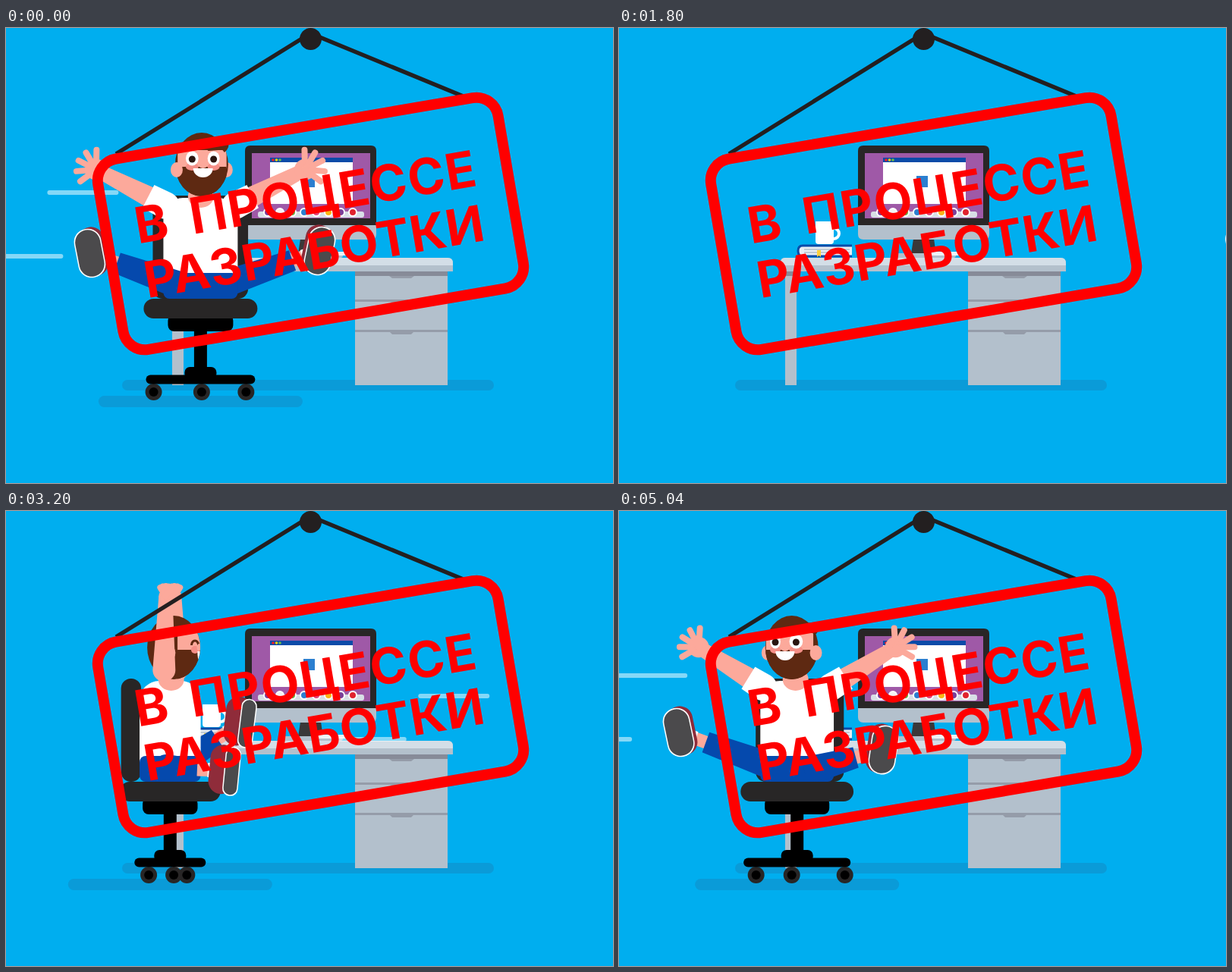
These frames come from a looping animation (800x600 px, 5.08 s). An HTML page with a canvas:

```html
<!DOCTYPE html>
<html lang="ru">
<head>
<meta charset="utf-8">
<title>В процессе разработки</title>
<style>
  html, body { margin: 0; width: 100%; height: 100%; overflow: hidden; background: #00aeef; }
  svg, canvas { position: absolute; left: 0; top: 0; width: 800px; height: 600px; display: block; }
  .sign text { font: 700 66px Inter, "DejaVu Sans", sans-serif; fill: #f00; text-anchor: middle; }
</style>
</head>
<body>
<svg viewBox="0 0 800 600">
  <rect x="153" y="464" width="490" height="14" rx="7" fill="#0a9bd8"/>
  <!-- desk -->
  <rect x="219" y="318" width="15" height="153" fill="#b3c0cc"/>
  <rect x="460" y="318" width="122" height="153" fill="#b3c0cc"/>
  <path d="M219 320h15v7h-15zM460 320h122v7H460z" fill="#878b98"/>
  <path d="M460 359.500H582M460 399.500H582" stroke="#959ca9" stroke-width="3"/>
  <path d="M505 327h33l-4 3h-25zM505 360h33l-4 3h-25zM505 400h33l-4 4h-25z" fill="#959ca9"/>
  <path d="M213 321V309q0-6 6-6H582q7 0 7 7v11z" fill="#b3c0cc"/>
  <path d="M213 313V309q0-6 6-6H582q7 0 7 7v3z" fill="#d3dee7"/>
  <!-- computer -->
  <path d="M388 278h27l3 20h-33z" fill="#3a3839"/>
  <rect x="360" y="297" width="84" height="6" rx="3" fill="#b3c0cc"/>
  <rect x="405" y="295" width="48" height="5" rx="2" fill="#eef3f7"/>
  <path d="M315 258H488V272q0 7-7 7H322q-7 0-7-7z" fill="#b3c0cc"/>
  <path d="M315 260V162q0-7 7-7H481q7 0 7 7V260z" fill="#292626"/>
  <rect x="324" y="165" width="156" height="86" fill="#9f59a7"/>
  <rect x="348" y="171" width="109" height="61" fill="#fff"/>
  <rect x="348" y="171" width="109" height="6" fill="#0b4ba8"/>
  <circle cx="352" cy="174" r="1.800" fill="#ed1c24"/>
  <circle cx="356.500" cy="174" r="1.800" fill="#ffd400"/>
  <circle cx="361" cy="174" r="1.800" fill="#6cbf45"/>
  <rect x="392" y="195" width="15" height="15" fill="#2b7fd0"/>
  <rect x="332" y="242" width="140" height="8" rx="3" fill="#d8dfe6"/>
  <g id="dock" stroke="#fff" stroke-width="2"></g>
  <!-- books and cup -->
  <path d="M307 287H242q-6 0-6 7t6 7H307" fill="#e9eef3" stroke="#0b4ba8" stroke-width="3"/>
  <path d="M244 292H304M244 296H304" stroke="#b3c0cc" stroke-width="1.500"/>
  <path d="M261 293h5v9l-2.500-2-2.500 2z" fill="#ffd23c"/>
  <circle cx="283" cy="271" r="7" fill="none" stroke="#fff" stroke-width="4"/>
  <path d="M259 255h24v26q0 4-4 4h-16q-4 0-4-4z" fill="#fff"/>
</svg>

<canvas id="stage" width="800" height="600"></canvas>

<svg class="sign" viewBox="0 0 800 600">
  <path d="M145 166L398 9M406 9L605 91" stroke="#231f20" stroke-width="5.500" fill="none"/>
  <circle cx="401.500" cy="14.500" r="14.500" fill="#231f20"/>
  <rect x="-267.500" y="-127.500" width="535" height="255" rx="29" fill="none" stroke="#f00" stroke-width="14"
        transform="translate(401.500 258) rotate(-9.700)"/>
  <text transform="translate(399 246) rotate(-9.700)" letter-spacing="1.500" word-spacing="11">В ПРОЦЕССЕ</text>
  <text transform="translate(410 318) rotate(-9.700)" letter-spacing=".5">РАЗРАБОТКИ</text>
</svg>

<script>
const g = document.getElementById('stage').getContext('2d');
const { sin, cos, abs, min, max, PI } = Math;
const SKIN = '#fca99b', HAIR = '#5e2912', BLUE = '#0549ad', DARK = '#282626', SHOE = '#8f2c3a';
const STEP = 40, FRAMES = 127, SPEED = 21.72, SPIN = 18;

// Foot path around the chair: angle, x, y
const FOOT = [
  [-165, 167, 285], [-118, 166, 337], [-51, 3, 347], [-15, -114, 315], [-3, -146, 297],
  [3, -157, 294], [15, -156, 292], [51, -135, 290], [118, -40, 265], [165, 120, 268], [195, 167, 285]
];

document.getElementById('dock').innerHTML =
  ['#7b3f98', '#f4f4f4', '#5fb446', '#2b7fd0', '#e0457b', '#f9b516', '#7b3f98', '#e0232e']
    .map((c, i) => `<circle cx="${345 + 16 * i}" cy="243" r="5" fill="${c}"/>`).join('');

function box(x, y, w, h, r, fill) {
  g.fillStyle = fill;
  g.beginPath();
  g.roundRect(x, y, w, h, r);
  g.fill();
}

function oval(x, y, rx, ry, fill) {
  g.fillStyle = fill;
  g.beginPath();
  g.ellipse(x, y, rx, ry, 0, 0, 2 * PI);
  g.fill();
}

function line(x1, y1, x2, y2, width, color, cap = 'round') {
  g.strokeStyle = color;
  g.lineWidth = width;
  g.lineCap = cap;
  g.beginPath();
  g.moveTo(x1, y1);
  g.lineTo(x2, y2);
  g.stroke();
}

// Tapered limb, round at the first end and flat at the second
function limb(x1, y1, r1, x2, y2, r2, fill) {
  const a = Math.atan2(y2 - y1, x2 - x1), nx = -sin(a), ny = cos(a);
  g.fillStyle = fill;
  g.beginPath();
  g.arc(x1, y1, r1, a + PI / 2, a - PI / 2);
  g.lineTo(x2 - nx * r2, y2 - ny * r2);
  g.lineTo(x2 + nx * r2, y2 + ny * r2);
  g.fill();
}

function footAt(deg) {
  const a = ((deg + 165) % 360 + 360) % 360 - 165;
  const i = max(1, FOOT.findIndex(k => k[0] >= a));
  const [a0, x0, y0] = FOOT[i - 1], [a1, x1, y1] = FOOT[i];
  const k = (a - a0) / (a1 - a0);
  return [x0 + (x1 - x0) * k, y0 + (y1 - y0) * k];
}

function chairBase(s, c) {
  const c2 = c * c, half = Math.sqrt(2116 + 3068 * c2), shift = 18 * s * c, reach = 24 + 37 * c2;
  const neck = 36 + 7 * c2, seat = 66 + 9 * c2;
  box(-8.5, 395, 17, 60, 0, '#000');
  box(-21, 447, 42, 16, 7, '#000');
  for (const x of [shift - reach, shift + reach, -28 * s * c]) {
    oval(x, 480, 11, 11, DARK);
    oval(x, 480, 6, 6, '#000');
  }
  box(-half, 457.5, 2 * half, 12, 6, '#000');
  box(-neck, 378, 2 * neck, 22, 8, '#000');
  box(-seat, 357, 2 * seat, 26, 13, DARK);
}

function backrest(s, c) {
  const half = 13 + 50 * abs(c) ** 3;
  box(53 * s * abs(s) - half, 221, 2 * half, 136, 13, DARK);
}

function leg(side, deg, c) {
  const [fx, y] = footAt(side * deg), x = side * fx;
  const hx = -side * 28 * c, hy = 339, dx = hx - x, dy = hy - y;
  const len = Math.hypot(dx, dy) || 1;
  const at = d => [x + dx * min(d / len, .8), y + dy * min(d / len, .8)];
  const [ax, ay] = at(24), [cx, cy] = at(38);
  line(x, y, cx, cy, 17, SKIN);
  line(x, y, ax, ay, 19, '#fff', 'butt');
  limb(hx, hy, 18, cx, cy, 14, BLUE);

  const w = 35 * min(1, max(.3, .35 + 1.2 * c)), out = -Math.sign(dx);
  g.save();
  g.translate(x, y);
  g.rotate(x / 160 * .21);
  const upper = () => box(-17 - out * 5, -34, 34, 65, 17, SHOE);
  const sole = () => {
    const sx = out * (35 - w) / 2;
    box(sx - w / 2 - .5, -32.5, w + 1, 65, w / 2, '#fff');
    box(sx - w / 2 + 1, -31, w - 2, 62, w / 2, '#4b4a4c');
  };
  if (c < -.6) upper();
  else { upper(); sole(); }
  g.restore();
}

function arm(side, c) {
  const c2 = c * c, k = abs(c);
  const x = -side * 138 * Math.sign(c) * k ** 1.8, y = 112 + 75 * k ** 3;
  const sx = -side * 46 * c, sy = 209 + 25 * c2;
  limb(sx, sy, 15, x, y, 9, SKIN);
  const dir = Math.atan2(y - sy, x - sx), spread = .28 + .28 * c2, reach = 13 + 13 * c2;
  oval(x, y, 9 + 5 * c2, 9 + 5 * c2, SKIN);
  for (let i = -2; i <= 2; i++) {
    const a = dir + i * spread;
    line(x, y, x + cos(a) * reach, y + sin(a) * reach, 8, SKIN);
  }
  if (c2 > .2) {
    const f = .25 * c2;
    limb(sx, sy, 18, sx + (x - sx) * f, sy + (y - sy) * f, 17, '#fff');
  }
}

function torso(s, c) {
  const half = 40 + 9 * c * c;
  box(-half, 224, 2 * half, 110, [26, 26, 4, 4], '#fff');
  box(-half, 323, 2 * half, 34, 8, BLUE);
  oval(-8 * s * c, 222, 17, 15, SKIN);
}

function head(deg, s, c) {
  const hx = -28 * s * c, rad = deg * PI / 180;
  const lon = a => hx - 34 * sin(rad + a);
  const near = s > 0 ? -1 : 1;
  const ear = side => oval(hx - side * 33 * c, 187, 8, 10, SKIN);
  ear(-near);

  g.save();
  g.beginPath();
  g.ellipse(hx, 180, 35, 42, 0, 0, 2 * PI);
  g.clip();
  g.fillStyle = HAIR;
  g.fillRect(hx - 40, 136, 80, c > 0 ? 90 : 77);
  // Visible part of the face
  const edge = 1.25;
  let left = hx - 40, right = hx + 40;
  if (cos(rad + edge) > 0) left = lon(edge);
  if (cos(rad - edge) > 0) right = lon(-edge);
  if (c < 0) {
    if (s > 0) left = hx - 40;
    else right = hx + 40;
    if (abs(s) < .4) right = left;
  }
  if (right > left) {
    g.fillStyle = SKIN;
    g.fillRect(left, 161, right - left, 24);
    g.fillStyle = HAIR;
    g.fillRect(left, 183, right - left, 42);
  }
  if (c > -.1) {
    for (const a of [-.43, .43]) {
      const k = cos(rad + a), x = lon(a);
      if (k < .1) continue;
      oval(x, 183, 9 * k, 5, '#f58f87');
      if (c > .8) {
        oval(x, 172, 9 * k, 9.5, '#fff');
        oval(x, 173, 4.5, 4.5, '#2a1510');
        line(x - 7 * k, 160, x + 7 * k, 159, 4, HAIR);
      } else {
        g.strokeStyle = HAIR;
        g.lineWidth = 3;
        g.beginPath();
        g.ellipse(x, 177, 8 * k, 6, 0, PI, 2 * PI);
        g.stroke();
      }
    }
    oval(lon(0), 180, 6 * max(.5, c), 5, SKIN);
    g.fillStyle = '#fff';
    g.beginPath();
    g.ellipse(lon(0), 185, 13 * max(.1, c), 12, 0, 0, PI);
    g.fill();
  }
  g.restore();
  if (c > .5) {
    g.fillStyle = HAIR;
    g.beginPath();
    g.moveTo(hx + 12, 142);
    g.quadraticCurveTo(hx + 32, 154, hx + 35, 146);
    g.quadraticCurveTo(hx + 38, 158, hx + 30, 164);
    g.fill();
  }
  ear(near);
}

function speedLines(n, dir) {
  for (const [y, start, stop] of [[217, 14, -36], [244, 19, -77], [301, 16, -90]]) {
    const age = ((n - start) % 16 + 16) % 16, tip = -330 + 36.5 * age;
    const a = min(tip, stop), b = min(tip - 88, -98);
    if (age < 10 && a > b) line(dir * a, y, dir * b, y, 6, 'rgba(255,255,255,.52)');
  }
}

function rider(x, deg, n, dir) {
  const rad = deg * PI / 180, s = sin(rad), c = cos(rad);
  const near = s > 0 ? -1 : 1, far = -near;
  g.save();
  g.translate(x, 0);
  box(-134.5, 485, 269, 15, 7.5, '#0a9bd8');
  speedLines(n, dir);
  if (c > 0) backrest(s, c);
  chairBase(s, c);
  arm(far, c);
  leg(far, deg, c);
  torso(s, c);
  leg(near, deg, c);
  head(deg, s, c);
  arm(near, c);
  if (c <= 0) backrest(s, c);
  g.restore();
}

function draw(now) {
  const frame = Math.floor(now / STEP) % FRAMES;
  const going = (frame + 20) % FRAMES, coming = frame - 45;
  g.clearRect(0, 0, 800, 600);
  if (going <= 53) rider(-178 + SPEED * going, -3 - SPIN * (going - 20), going, 1);
  else if (coming >= 0 && coming <= 53) rider(976.5 - SPEED * coming, 10 + SPIN * coming, coming, -1);
}

const begin = performance.now();
function tick() {
  draw(performance.now() - begin);
  requestAnimationFrame(tick);
}
tick();
</script>
</body>
</html>
```
